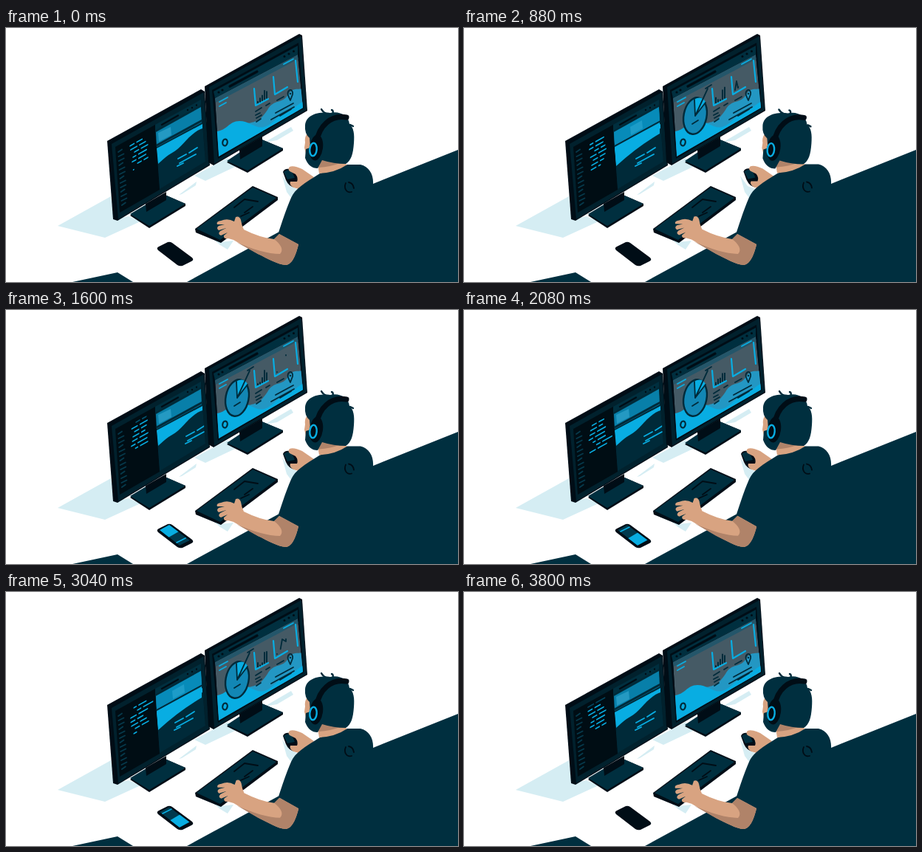
Write an HTML page that moves like this. It is 612x344 px and loops after 3.84 s.

```html
<!DOCTYPE html>
<html lang="en">
<head>
<meta charset="utf-8">
<title>Developer at work</title>
<style>
html, body { margin: 0; width: 100%; height: 100%; overflow: hidden; background: #fff; }
svg { display: block; width: 612px; height: 344px; stroke-width: 1.8; }
.navy { fill: #002f3f; } .ink { fill: #000d16; } .blue { fill: #08ade2; } .bezel { fill: #01212d; }
.skin { fill: #d8a381; } .shade { fill: #b08369; } .cast { fill: #d5edf3; }
.line { fill: none; stroke: #002b3b; stroke-linecap: round; stroke-linejoin: round; }
.glow { stroke: #08ade2; } .black { stroke: #000d16; } .dim { stroke: #063a4c; }
</style>
</head>
<body>
<svg viewBox="0 0 612 344">
  <defs>
    <clipPath id="page"><path d="M202 139 264 104 270 181 208 218Z"/></clipPath>
    <clipPath id="dash"><path d="M283 95 395 36 402 108 288 174Z"/></clipPath>
    <clipPath id="editor"><path d="M165 152 202 131 207 213 170 234Z"/></clipPath>
    <clipPath id="glass"><path d="M208 298 221 291 249 312 235 319Z"/></clipPath>
  </defs>

  <!-- desk, floor and cast shadows -->
  <path class="navy" d="M90 344 151 331 172 344ZM245 344 368 277 497 211 612 165V344Z"/>
  <path class="cast" d="M70 268 142 228 146 259 166 255 182 262 134 284ZM234 226 258 208 257 213 238 225ZM255 200 300 176 310 188 270 207ZM350 155 386 134 389 139 367 152ZM278 284 290 290 308 288 300 300 290 294ZM374 200 384 214 394 218 386 230 380 222Z"/>

  <!-- left monitor -->
  <path class="ink" d="M168 254 194 271 243 241V238L213 225Z"/>
  <path class="navy" d="M168 252 194 268 243 238 213 225Z"/>
  <path class="ink" d="M189 238 217 222V233L190 249Z"/>
  <path class="ink" d="M137 153 264 83 269 86 276 186 151 261 145 259Z"/>
  <path class="bezel" d="M143 157 268 87 275 185 152 259Z"/>
  <path d="M148 161 202 131 208 219 154 250Z" fill="#000d14"/>
  <path class="line dim" id="gutter"/>
  <g clip-path="url(#editor)"><g id="code" transform="matrix(1 -.56 .07 1 143 156)"></g></g>
  <path class="navy" d="M202 131 264 97 264 104 202 139Z"/>
  <path class="line black" d="M211 131 233 118.500M246 111v0M252 108v0M258 104.500v0" stroke-width="2.4"/>
  <g clip-path="url(#page)">
    <path d="M202 139 264 104 270 181 208 219Z" fill="#002a39"/>
    <g id="slideA">
      <path d="M203 141 264 107 265 128 204 161Z" fill="#087fa9"/>
      <path d="M206 142 223 134 224 145 207 154Z" fill="#2499c2"/>
      <path class="line" d="M204 159 266 125" stroke-width="3"/>
      <path class="blue" d="M204 163 266 130V136C248 142 239 162 225 169 217 173 211 180 206 184Z"/>
    </g>
    <g id="slideB">
      <path d="M203 141 264 107 265 126 204 159Z" fill="#078bb9"/>
      <path d="M225 134 241 125 242 136 226 145Z" fill="#1d9cc8"/>
      <path class="blue" d="M204 161 265 128V143Q234 161 206 187Z"/>
      <path class="line" d="M204 160 266 126"/>
    </g>
    <path class="line glow" id="copy" d="M233 177 244 171M248 169 259 162M235 183 257 171M232 187 240 183"/>
  </g>

  <!-- right monitor -->
  <path class="ink" d="M299 182 327 196 375 166V163L344 150Z"/>
  <path class="navy" d="M299 180 327 193 375 163 344 150Z"/>
  <path class="ink" d="M316 165 347 147V160L317 178Z"/>
  <path class="ink" d="M269 79 397 8 401 10 408 112 281 186 274 182Z"/>
  <path class="bezel" d="M275 80 400 11 407 111 282 184Z"/>
  <path class="ink" d="M279 84 396 20 403 109 287 177Z"/>
  <path class="navy" d="M281 86 395 24 395 36 283 95Z"/>
  <path class="line black" d="M288 87v0M293 84v0M377 38.500v0M383 35v0M389.500 31.500v0M303 79 340 59" stroke-width="3.2"/>
  <g clip-path="url(#dash)">
    <path d="M283 95 395 36 402 108 288 174Z" fill="#455a65"/>
    <path d="M283 95 395 36 396 42 284 101Z" fill="#24566a"/>
    <path d="M318 129C339 130 346 123 354 111 363 95 374 104 382 90 389 80 394 84 402 82V109L330 150Z" fill="#2397c3"/>
    <path class="blue" d="M285 140C299 139 302 126 316 126 330 126 338 137 350 134 362 130 368 118 380 114 391 110 394 103 402 100V110L288 176Z"/>
    <path class="line glow" d="M289 100 300 94M289 106 298 101M376 49 389 42"/>
    <path class="line glow" d="M336 82 338 105 355 96M362 66 364 90 381 80M392 44 395 73" stroke-width="2.2"/>
    <path class="line" d="M338 113 346 108M338 118 344 115M339 122 346 118M339 127 345 123M352 105 357 102M367 98 376 93M359 124 390 107M365 115 389 102M371 119 386 110"/>
    <ellipse class="line" cx="296.500" cy="155" rx="3.200" ry="4.500" transform="rotate(12 296.500 155)" stroke-width="2.2"/>
    <path class="line" d="M385 98C382 92 380 88 383 85 386 82 389 86 388 90Z"/>
    <circle class="navy" cx="385" cy="89" r="1.300"/>
    <path class="line" id="bars" stroke-width="2" style="stroke-linecap:butt"/>
    <path class="line" id="trend" pathLength="100" d="M367 84 369 72 371 81 374 64 379 67 379 61"/>
    <g id="pie">
      <ellipse id="disc" cx="313" cy="119" rx="15.500" ry="25" transform="rotate(11 313 119)" fill="#1287b5"/>
      <ellipse class="line" id="ring" cx="313" cy="119" rx="15.500" ry="25" pathLength="100" transform="rotate(11 313 119)" stroke-width="2.4"/>
      <g id="slices">
        <path class="blue" d="M313 119 312 97Q321 91 327 100Z"/>
        <path class="line" d="M312 97 313 119 330 82M313 119 327 101M309 130 317 125M327 82 335 77"/>
      </g>
    </g>
  </g>

  <!-- keyboard and phone -->
  <path class="ink" d="M256 272 334 214 368 229V233L291 291 257 277Z"/>
  <path class="navy" d="M258 272 334 216 366 230 290 287Z"/>
  <path class="line black" d="M309 243 323 232 341 235M323 250 334 242M318 255 329 250"/>
  <path class="ink" d="M207 296 219 290Q222 289 225 291L252 311Q255 314 251 316L239 322Q235 323 232 321L206 301Q203 298 207 296Z"/>
  <g id="phone" clip-path="url(#glass)">
    <path d="M208 298 221 291 249 312 235 319Z" fill="#01394d"/>
    <path class="blue" id="card" d="M206 299 221 290 234 300 220 308Z"/>
    <path class="line glow" id="bar" d="M231 315 243 309"/>
  </g>

  <!-- mouse hand -->
  <g id="mouse">
    <path class="ink" d="M375 195Q377 190 384 191 393 194 396 203 399 214 391 216 383 215 379 206Z"/>
    <path class="navy" d="M376 195Q381 190 387 194L391 203 381 205Z"/>
    <path class="skin" d="M384 188C388 186 394 188 401 191L417 202 400 219 389 216Q383 212 385 208L394 208Q396 203 392 198L384 194Q381 191 384 188Z"/>
  </g>

  <!-- person -->
  <g id="body">
    <path class="navy" d="M368 280C374 262 379 246 386 230 391 218 404 210 425 197L462 185H480C492 188 498 199 497 212V344H368Z"/>
    <path class="skin" d="M421 178 424 197Q446 196 462 185L440 175Z"/>
    <path class="shade" d="M421 178 423 189Q440 188 452 183L440 175Z"/>
    <path class="line black" d="M460 210C457 217 461 224 468 222M464 209Q470 210 471 217"/>
  </g>
  <g id="head">
    <path class="line" d="M434 116Q429 114 427 110M442 117Q444 112 441 111M466 131 470 133" stroke-width="2.4"/>
    <path class="skin" d="M407 144Q404 149 405 155L404 162 407 174 420 177 418 146Z"/>
    <path class="navy" d="M405 132C406 118 422 113 439 115 452 112 464 119 465 130 471 135 472 144 471 156 470 171 467 180 460 184Q444 184 428 179L422 190Q410 190 405 176L406 164 412 162 411 149Q404 143 405 132Z"/>
    <path class="line black" d="M421 153C424 134 439 117 461 121" stroke-width="7"/>
    <ellipse class="ink" cx="420" cy="162" rx="9" ry="17.500" transform="rotate(8 420 162)"/>
    <ellipse class="line glow" cx="416" cy="164.500" rx="4.700" ry="8.800" transform="rotate(5 416 164.500)" stroke-width="2.4"/>
  </g>

  <!-- typing arm -->
  <g id="arm">
    <path class="skin" d="M322 273Q319 267 318 260 316 254 311 256L309 262Q300 257 291 261 284 262 286 266L296 266 288 268Q284 271 288 274L298 271 290 275Q286 279 291 281L300 277 295 281Q294 286 301 285L308 287 341 306C354 312 369 321 379 321 388 320 393 306 396 293L370 279 363 286Q344 284 322 273Z"/>
    <path class="shade" d="M363 286 370 279 396 293C393 306 388 320 379 321 369 321 354 312 341 306L312 290C334 300 355 306 371 306 377 300 371 292 363 286Z"/>
  </g>
</svg>
<script>
const LOOP = 3840, ROWS = 14, ROW_STEP = 5.6, VISIBLE = 7;
const $ = id => document.getElementById(id);
const clamp = x => Math.max(0, Math.min(1, x));
const ease = x => (x = clamp(x), x * x * (3 - 2 * x));
const wave = (t, cycles, phase = 0) => Math.sin(2 * Math.PI * (t / LOOP * cycles + phase));
// Rises between a and b, falls between c and d.
const pulse = (t, a, b, c, d) => ease((t - a) / (b - a)) - ease((t - c) / (d - c));
const move = (id, x, y) => $(id).setAttribute('transform', `translate(${x} ${y})`);

let seed = 11;
const random = () => (seed = seed * 16807 % 2147483647) / 2147483647;
const rows = Array.from({ length: ROWS }, () => {
  const start = 24 + 10 * random(), first = 2 + 7 * random();
  return [[start, first], [start + first + 4, 4 + 9 * random()]];
});

let gutter = '';
for (let i = 0; i < 13; i++) gutter += `M${152 + i * .4} ${168 + i * 6}l${i % 3 ? 7 : 5} -3.5`;
$('gutter').setAttribute('d', gutter);

const code = Array.from({ length: VISIBLE + 1 }, () => {
  const path = document.createElementNS('http://www.w3.org/2000/svg', 'path');
  path.setAttribute('class', 'line glow');
  $('code').append(path);
  return path;
});

function drawCode(t) {
  const at = t / LOOP * ROWS, top = Math.floor(at), typed = at - top;
  const scroll = ease((typed - .65) / .35);
  code.forEach((path, i) => {
    const y = 17 + (i - scroll) * ROW_STEP;
    let left = i < VISIBLE - 1 ? 99 : i === VISIBLE - 1 ? typed * 38 : 0, d = '';
    for (const [x, width] of rows[(top + i) % ROWS]) {
      const w = Math.min(width, left);
      if (w > 0) d += `M${x} ${y}h${w}`;
      left -= width;
    }
    path.setAttribute('d', d);
    path.style.opacity = i ? 1 : 1 - scroll;
  });
}

function drawDashboard(t) {
  const pie = pulse(t, 100, 720, 3380, 3760);
  $('pie').style.opacity = pie > 0 ? 1 : 0;
  $('ring').style.strokeDasharray = `${pie * 100} 100`;
  $('slices').style.opacity = $('disc').style.opacity = ease(pie * 2 - 1);

  let bars = '';
  [3, 6, 8, 13, 10].forEach((height, i) => {
    const h = height + 3 * (wave(t, 2, i * .23 - .15) - wave(0, 2, i * .23 - .15));
    bars += `M${341 + i * 3} ${102 - i * 1.6}v${-Math.max(2, h)}`;
  });
  $('bars').setAttribute('d', bars);

  const tip = (t < 2000 ? t - 550 : t - 2350) / 1080 * 148;
  const from = clamp((tip - 45) / 100) * 100, to = clamp(tip / 100) * 100;
  $('trend').style.opacity = to > from ? 1 : 0;
  $('trend').style.strokeDasharray = `0 ${from} ${to - from} 200`;
}

function draw(t) {
  drawCode(t);
  drawDashboard(t);

  const slide = pulse(t, 400, 640, 1200, 1440) + pulse(t, 2320, 2560, 3320, 3560);
  $('slideB').style.opacity = slide;
  const shift = pulse(t, 1200, 1500, 2150, 2450);
  move('copy', 11 * shift - 4 * pulse(t, 2750, 3000, 3350, 3650), -6 * shift);

  const flip = ease((t - 1680) / 340);
  $('phone').style.opacity = pulse(t, 1180, 1360, 3440, 3600);
  move('card', 15 * flip, 11 * flip);
  move('bar', -19 * flip, -15 * flip);

  const reach = pulse(t, 320, 760, 1040, 1480);
  move('mouse', 3.5 * reach, -.5 * reach);
  move('body', 0, -.5 * pulse(t, 100, 800, 2000, 2760));
  move('head', -.6 * reach, .4 * reach);
  const tap = (1 - Math.cos(2 * Math.PI * t / LOOP * 12)) / 2;
  $('arm').setAttribute('transform', `rotate(${tap * .8} 380 306)`);
}

function frame(now) {
  draw(now % LOOP);
  requestAnimationFrame(frame);
}
requestAnimationFrame(frame);
</script>
</body>
</html>
```
